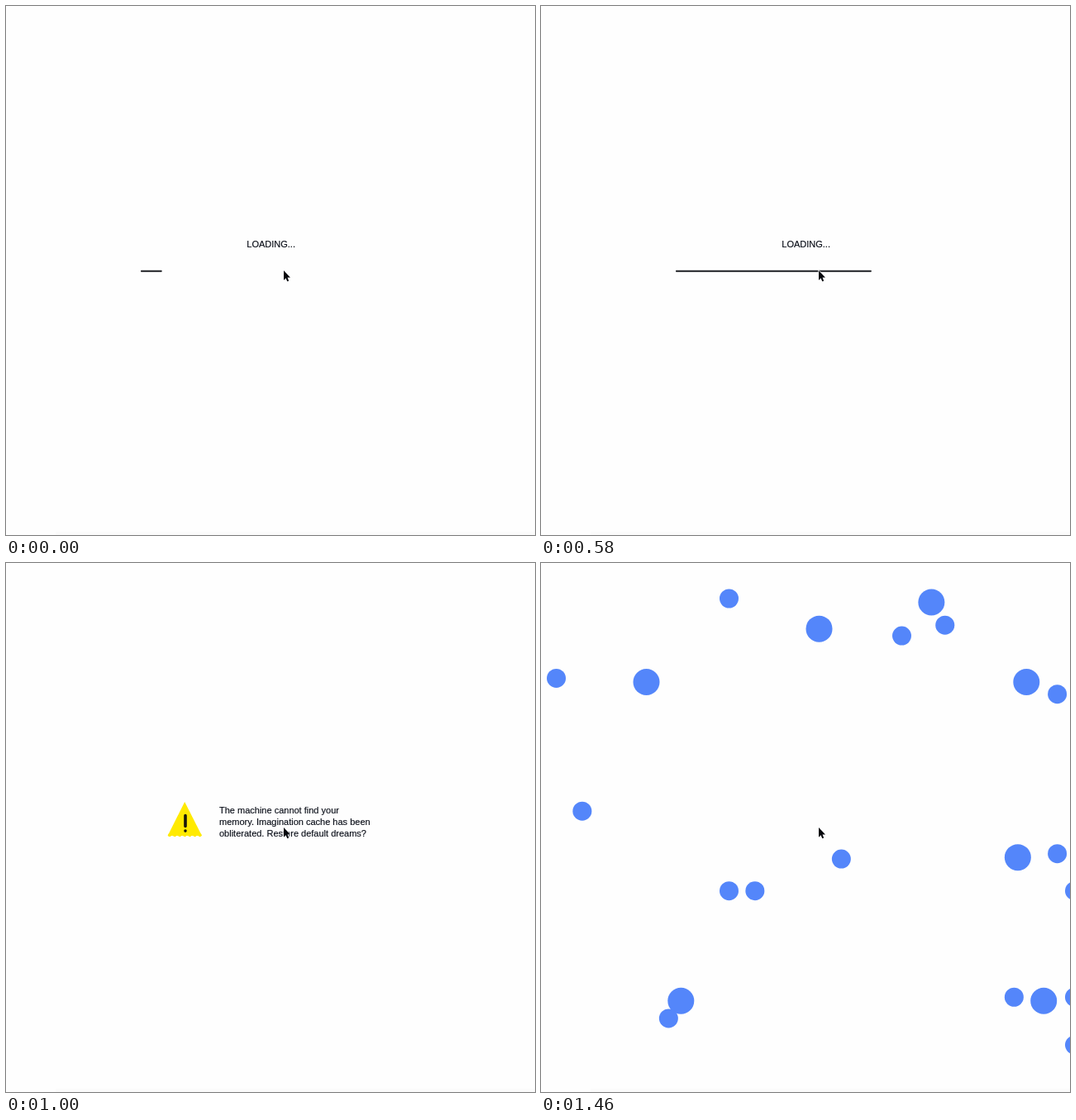
Write an HTML page that moves like this. It is 640x640 px and loops after 1.48 s.

```html
<!DOCTYPE html>
<html lang="en">
<head>
<meta charset="utf-8">
<title>Loading</title>
<style>
  html, body { margin: 0; width: 100%; height: 100%; overflow: hidden; background: #fefefe; }
  svg { display: block; width: 100%; height: 100%; }
  text { font: 11px "Liberation Sans", Arial, sans-serif; fill: #0a0e18; stroke: #0a0e18; stroke-width: .15; }
</style>
</head>
<body>
<svg viewBox="0 0 640 640">
  <rect x="60" y="636" width="580" height="4" fill="#fbfbfb"/>

  <g id="loader">
    <text x="291.3" y="292">LOADING...</text>
    <rect id="bar" x="163" y="319.8" height="1.9" rx=".8" fill="#1c1e22"/>
  </g>

  <g id="dialog">
    <path d="M216.2 289 L237 330 H195.6 Z" fill="#ffea00"/>
    <path d="M198 329.3 H236" stroke="#ffea00" stroke-width="4" stroke-linecap="round" stroke-dasharray="0 6.1"/>
    <path d="M217 305.5 V318.5 M217 324 V324.1" stroke="#17170c" stroke-width="3.6" stroke-linecap="round"/>
    <text x="258" y="303">The machine cannot find your</text>
    <text x="258" y="317">memory. Imagination cache has been</text>
    <text x="258" y="330.5">obliterated. Restore default dreams?</text>
  </g>

  <g id="likes" fill="#5486fa"></g>

  <path d="M336 320 V331.8 L338.6 329.3 L340.3 333.3 L342.2 332.5 L340.5 328.6 H344 Z"
        fill="#05070c" stroke="#fff" stroke-width="1.2" paint-order="stroke"/>
</svg>
<script>
const DURATION = 1480, STEP = 20;
const DIALOG_AT = 800, LIKES_AT = 1160;
const el = id => document.getElementById(id);
const scenes = ["loader", "dialog", "likes"].map(el);

// Likes sit at whole percentages of a 1045 x 643 page: { top: [left, ...] }.
function addLikes(radius, rows) {
  for (const [top, lefts] of Object.entries(rows)) {
    for (const left of lefts) {
      const x = 7 + left * 10.45 + radius, y = 31.5 + top * 6.43 + radius;
      el("likes").innerHTML += `<circle cx="${x}" cy="${y}" r="${radius}"/>`;
    }
  }
}
addLikes(16, { 0: [43], 5: [30], 15: [10, 54], 48: [53], 75: [14, 56] });
addLikes(11.5, {
  0: [20], 5: [45], 7: [40], 15: [0], 18: [58], 40: [3],
  48: [58], 49: [33], 55: [20, 23, 60], 75: [53, 60], 79: [13], 84: [60]
});

function draw(t) {
  const active = t < DIALOG_AT ? 0 : t < LIKES_AT ? 1 : 2;
  scenes.forEach((scene, i) => { scene.style.display = i === active ? "" : "none"; });
  el("bar").setAttribute("width", 25.7 + 0.364 * t);
}

const start = performance.now();
function tick() {
  const t = (performance.now() - start) % DURATION;
  draw(Math.floor(t / STEP) * STEP);
  requestAnimationFrame(tick);
}
tick();
</script>
</body>
</html>
```
